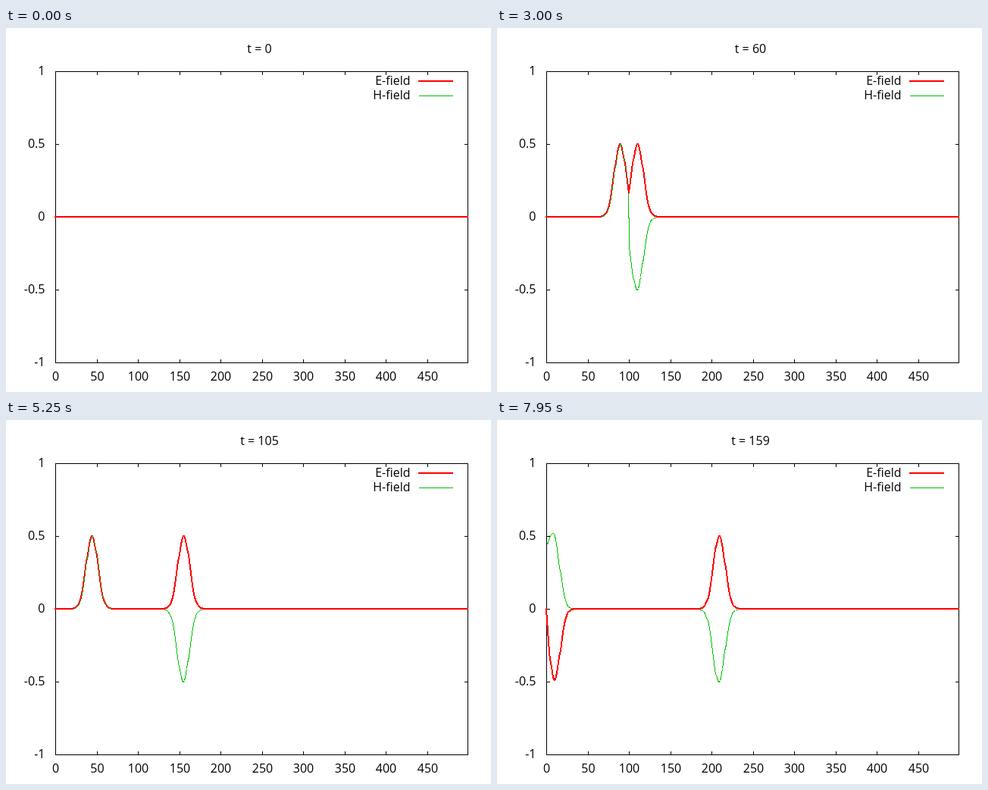
These frames come from a looping animation (640 by 480 pixels, 8 s). An HTML page:

```html
<!DOCTYPE html>
<html lang="en">
<head>
<meta charset="utf-8">
<title>Field pulse</title>
<style>
  html, body { margin: 0; width: 100%; height: 100%; overflow: hidden; background: #fff; }
  svg { display: block; width: 640px; height: 480px; }
  text { font: 16px "Open Sans", "Noto Sans", sans-serif; fill: #000; }
  path { fill: none; shape-rendering: crispEdges; }
  .mid { text-anchor: middle; }
  .end { text-anchor: end; }
  .axis { stroke: #000; stroke-width: 1; }
  .e { stroke: #f00; stroke-width: 2; stroke-linejoin: round; }
  .h { stroke: #00c000; stroke-width: 1; }
  .dash { stroke-dasharray: 5 5; }
</style>
</head>
<body>
<svg viewBox="0 0 640 480">
  <text id="title" class="mid" x="334.5" y="33"></text>
  <g id="labels"></g>
  <text class="end" x="533.5" y="75">E-field</text>
  <text class="end" x="533.5" y="94">H-field</text>
  <path class="e" d="M544 70H590"/>
  <path class="h" d="M545 89.5H590"/>
  <path id="frame" class="axis"/>
  <path id="hLine" class="h"/>
  <path id="eLine" class="e"/>
  <path id="overlap" class="h dash"/>
</svg>
<script>
const SIZE = 500, SOURCE = 100, DELAY = 50, STEPS = 160, STEP_MS = 50;
const LEFT = 65, RIGHT = 609, TOP = 57, BOTTOM = 441;
const $ = id => document.getElementById(id);
const px = m => LEFT + Math.round(m * (RIGHT - LEFT) / (SIZE - 1));
const py = v => Math.round((TOP + BOTTOM) / 2 - v * (BOTTOM - TOP) / 2);

function drawAxes() {
  let d = `M${LEFT + .5} ${TOP + .5}H${RIGHT + .5}V${BOTTOM + .5}H${LEFT + .5}Z`;
  let labels = '';
  for (let m = 0; m < SIZE - 1; m += 50) {
    const x = px(m) + .5;
    d += `M${x} ${BOTTOM}v-4M${x} ${TOP + 1}v4`;
    labels += `<text class="mid" x="${x}" y="465">${m}</text>`;
  }
  for (let v = -1; v <= 1; v += .5) {
    const y = py(v) + .5;
    d += `M${LEFT + 1} ${y}h4M${RIGHT} ${y}h-4`;
    labels += `<text class="end" x="51.5" y="${y + 4.5}">${v}</text>`;
  }
  $('frame').setAttribute('d', d);
  $('labels').innerHTML = labels;
}

// One-dimensional leapfrog wave with a reflecting left wall.
function simulate() {
  const e = new Float64Array(SIZE), h = new Float64Array(SIZE), states = [];
  for (let t = 0; t < STEPS; t++) {
    for (let m = 0; m < SIZE - 1; m++) h[m] += e[m + 1] - e[m];
    for (let m = 1; m < SIZE - 1; m++) e[m] += h[m] - h[m - 1];
    e[SOURCE] += Math.exp(-((t - DELAY) ** 2) / 100);
    states.push({ e: e.slice(), h: h.slice() });
  }
  return states;
}

function curve(values, offset, visible = () => true) {
  let d = '', pen = false;
  values.forEach((v, m) => {
    const show = visible(m);
    if (show) d += `${pen ? 'L' : 'M'}${px(m) + offset} ${py(v) + offset}`;
    pen = show;
  });
  return d;
}

const states = simulate();
let shown = -1;

function render(now) {
  const t = Math.floor(now / STEP_MS) % STEPS;
  if (t !== shown) {
    shown = t;
    const { e, h } = states[t];
    const shared = m => e[m] > .003 && Math.abs(e[m] - h[m]) < .003;
    $('title').textContent = `t = ${t}`;
    $('hLine').setAttribute('d', curve(h, .5));
    $('eLine').setAttribute('d', `M64 249H65${curve(e, 0).replace('M', 'L')}H610`);
    $('overlap').setAttribute('d', curve(h, .5, shared));
  }
}

const start = performance.now();
function tick() {
  render(performance.now() - start);
  requestAnimationFrame(tick);
}

drawAxes();
tick();
</script>
</body>
</html>
```
